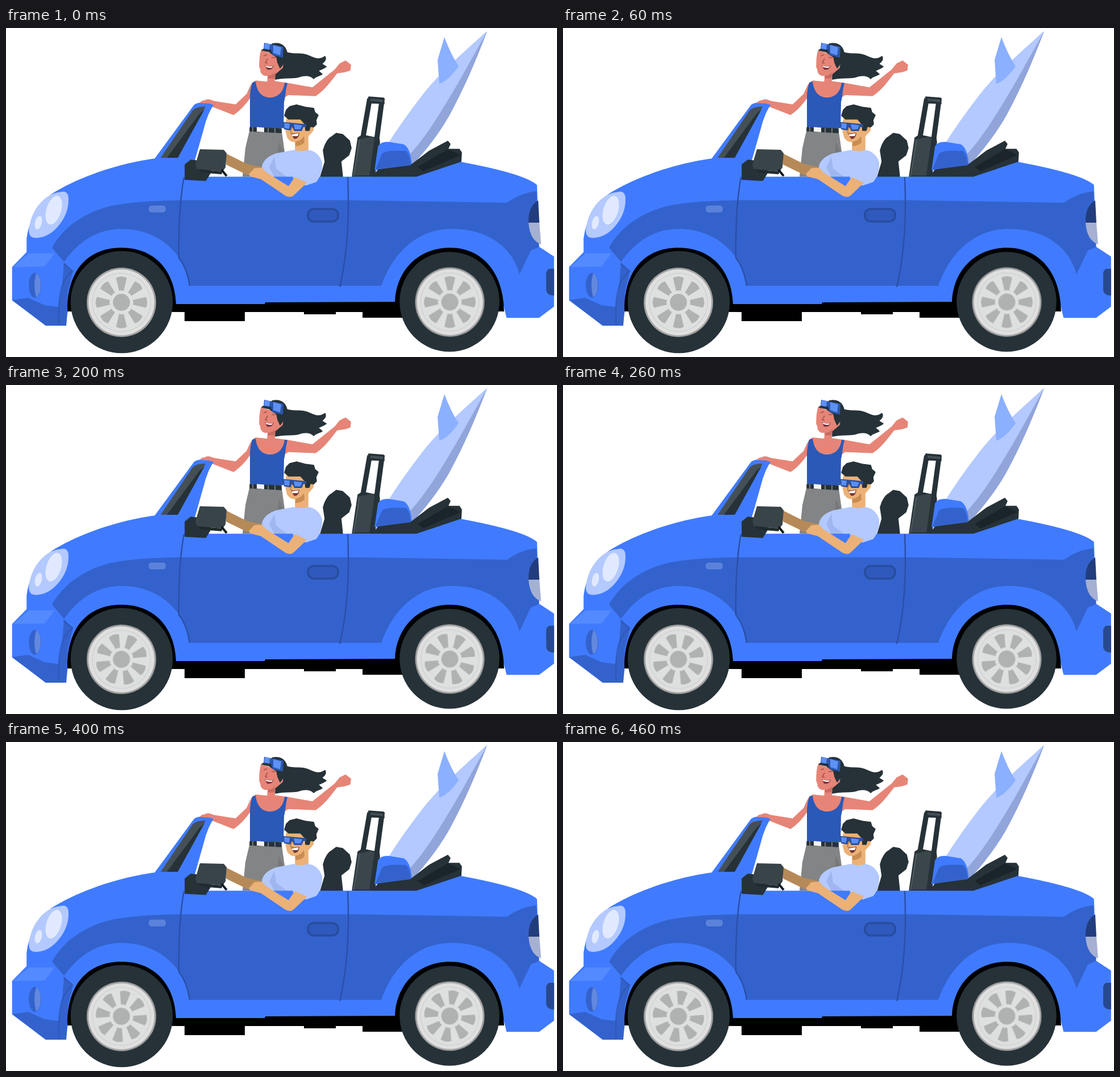
Write an HTML page that moves like this. It is 969x578 px and loops after 0.5 s.

```html
<!DOCTYPE html>
<html lang="en">
<head>
<meta charset="utf-8">
<title>Convertible road trip</title>
<style>
  html, body { margin: 0; width: 100%; height: 100%; overflow: hidden; background: #fff; }
  svg { display: block; width: 969px; height: 578px; }
  .ink { fill: #263238; stroke: #263238; }
  .blue { fill: #407bff; stroke: #407bff; }
  .shade { fill: #3462cc; }
  .pale { fill: #b3c9ff; stroke: #b3c9ff; }
  .rose { fill: #e68577; stroke: #e68577; }
  .tan { fill: #ebb177; stroke: #ebb177; }
  .ink, .blue, .pale, .rose, .tan { stroke-width: 1.6; stroke-linejoin: round; }
  .seam { fill: none; stroke: #2a4fa8; stroke-width: 2.4; }
  .spin { transform-origin: 0 0; animation: spin .5s steps(5, end) infinite; }
  @keyframes spin { to { transform: rotate(-45deg); } }
</style>
</head>
<body>
<svg viewBox="0 0 969 578">
  <defs>
    <path id="slot" d="M-4-20L-9.5-43Q0-48 9.5-43L4-20Q0-22-4-20Z"/>
    <g id="slots">
      <use href="#slot"/>
      <use href="#slot" transform="rotate(90)"/>
      <use href="#slot" transform="rotate(180)"/>
      <use href="#slot" transform="rotate(270)"/>
    </g>
    <g id="wheel">
      <circle r="61" fill="#a3a3a3"/>
      <circle r="58" fill="#e0e0e0"/>
      <circle r="52" fill="#d0d1d1"/>
      <circle r="50.5" fill="#dedfdf"/>
      <g fill="#b0b2b2">
        <use href="#slots"/>
        <use href="#slots" transform="rotate(45)"/>
        <circle r="15"/>
      </g>
    </g>
  </defs>

  <!-- standing passenger -->
  <path class="ink" d="M468 28C480 25 491 29 494 43C507 48 520 42 533 49C544 54 551 57 561 50C564 56 559 60 555 63L563 68C557 73 552 73 549 75L556 81C550 85 547 83 541 89C536 83 524 82 515 86C504 89 488 86 474 90L466 55Z"/>
  <path class="rose" d="M449 40C446 50 446 60 446 68L448 73C448 80 453 85 461 83L460 95L440 93C432 95 429 105 424 116L404 135L366 129L357 126L344 129L343 133L364 138L400 152C414 143 423 131 430 121H490L496 117L544 119C560 109 570 94 582 79L596 77L605 74L606 65L597 58L587 63L579 73L539 105L494 97L472 94L473 81L486 70L488 53Z"/>
  <path d="M460 84C466 84 471 81 474 77L472 88Q467 89 460 88Z" fill="#c96b63"/>
  <path class="ink" d="M450 39L470 28L489 38L488 62L482 70L478 61L476 51L463 42Z"/>
  <path d="M454 26L488 33L487 52L469 48L466 38L453 37Z" fill="#2c57ae"/>
  <path d="M455 27L464 28L463 38L454 36ZM470 30L484 34L482 48L470 44Z" fill="#5e91f5"/>
  <path d="M453 49L459 47M467 52L474 52M460 54L456 61L460 62" fill="none" stroke="#a4534f" stroke-width="1.6"/>
  <path d="M455 65Q463 69 471 66Q468 75 459 73Z" fill="#7c333a"/>
  <path d="M456 66Q464 69 470 67L467 70Q460 70 457 68Z" fill="#fff"/>
  <path d="M433 96L439 94C441 111 449 122 464 122C480 122 488 111 490 96L495 97C491 111 492 119 489 130L488 176H429V122Q429 109 433 96Z" fill="#2b59b8"/>
  <path d="M428 181L485 182L491 224V261H416L421 211Z" fill="#828485"/>
  <path d="M480 200L491 224V261H474Z" fill="#767879"/>
  <path class="ink" d="M429 175L484 177V184L429 181Z"/>
  <path d="M441 174L454 175V183L441 182Z" fill="#f3f3f3"/>
  <path d="M434 174V182M461 176V184M473 176V185" stroke="#777" stroke-width="2"/>

  <!-- seat and luggage -->
  <path class="ink" d="M553 262L561 235L558 215C561 202 568 193 573 191L581 185L592 187L604 198L607 211L603 223L589 234L592 262Z"/>
  <path d="M628 191L639 128H661L652 195" fill="none" stroke="#263238" stroke-width="9"/>
  <path class="ink" d="M638 121L664 123L665 133L636 131Z"/>
  <path d="M641 124L663 126V130L641 128Z" fill="#455056"/>
  <path class="ink" d="M609 261L619 193L627 188L656 194L657 201L648 261Z"/>
  <path d="M619 196L644 191L648 195L639 259H612Z" fill="#3b464b"/>
  <path d="M622 197L611 260" stroke="#4f5a5f" stroke-width="2"/>
  <path class="pale" d="M845 7C807 42 768 74 733 118Q698 163 671 206L712 242C736 217 759 188 778 155C805 106 826 55 845 7Z"/>
  <path d="M846 6C827 56 806 106 779 155C760 188 737 217 713 243L710 222C740 190 770 140 800 88Z" fill="#91a5da"/>
  <path d="M771 16L759 56L762 98Q779 92 796 67Q783 48 771 16Z" fill="#8bb0ff"/>
  <path class="blue" d="M649 249L655 208Q660 200 674 201L699 205Q712 213 713 243L690 251Z"/>
  <path class="shade" d="M650 248L661 221Q667 214 704 216Q711 224 712 242Z"/>
  <path class="ink" d="M644 262L655 249L711 242L745 216L777 199L781 204L777 213L797 213L801 219L800 236L724 264Z"/>
  <path d="M724 244L777 213L800 223L734 252Z" fill="#1b2529"/>

  <!-- driver -->
  <path class="tan" d="M494 158C491 170 491 181 495 192Q500 200 509 200V215Q520 222 531 215L531 190L540 180L541 166L532 157Z"/>
  <path d="M509 200Q519 198 524 190L525 201Q518 208 509 207Z" fill="#c98c52"/>
  <path class="ink" d="M493 144L499 138L511 135L526 139L541 141L543 148L549 153L545 162L546 169L541 174L535 173L533 180L527 180L526 169L518 160L497 160L490 154Z"/>
  <path d="M486 165L528 169V174L523 174L520 181L507 181L504 175L500 180L489 178Z" fill="#294f9c"/>
  <path d="M489 167L499 168L498 177L490 176ZM506 169L521 171L518 178L508 178Z" fill="#5a8ef4"/>
  <path d="M503 174L500 184L505 185" fill="none" stroke="#bd834c" stroke-width="1.6"/>
  <path d="M501 186L516 184Q515 195 507 195Z" fill="#773433"/>
  <path d="M502 187L515 185L513 190L504 190Z" fill="#fff"/>
  <path d="M386 220L424 239L448 244L437 258L424 258L387 240Z" fill="#b68a58"/>
  <path class="pale" d="M451 242Q455 228 475 221L506 215Q520 219 531 215Q548 217 555 235Q557 251 546 270L529 276L450 266Z"/>
  <path d="M472 226L463 245L473 263H496L475 247Z" fill="#a0b6ef"/>

  <!-- bodywork -->
  <path class="blue" d="M262 230C208 237 139 258 91 286C58 303 40 342 37 370V394L11.5 420V478L70 522H105L109 486H690L874 480L881 508.5H937L963 489V402L937 385L933 276C913 259 854 246 800 236L722 262H318L335 235Z"/>
  <path class="shade" d="M81 386C102 347 143 322 187 312C230 304 284 303 310 302.5H605L881 307Q906 289 933 287L937 385L923 391L903 433C892 390 853 353 784 353C724 353 681 394 660 453H323C315 397 270 353 202 353Q142 354 102 411Z"/>
  <path d="M40 396H85L68 419L12 420Z" fill="#548aff"/>
  <path class="shade" d="M11 478L39 474L68 487L92 490L99 448L102 412L118 427L109 463L106 523H70Z"/>
  <path class="seam" d="M101 414L117 427Q94 444 93 490V521" opacity=".5"/>
  <ellipse cx="51" cy="452" rx="11" ry="22" class="shade"/>
  <path d="M53 431C64 435 64 468 53 473Q47 452 53 431Z" fill="#6288df"/>
  <path class="seam" d="M313 262Q303 315 304 404Q318 421 323 453M601 262Q606 374 587 455"/>
  <rect x="531" y="318" width="53" height="22" rx="10" fill="#3059bd" stroke="#284d9f" stroke-width="3.6"/>
  <rect x="251" y="312" width="30" height="12" rx="5" fill="#5b82db"/>
  <path class="pale" d="M96 289Q108 286 109 298C111 330 85 366 54 368Q41 369 41 356C43 325 65 292 96 289Z"/>
  <g fill="#e0e9ff">
    <ellipse rx="13" ry="26" transform="translate(84 320) rotate(17)"/>
    <ellipse rx="6" ry="12" transform="translate(57 342) rotate(13)"/>
  </g>
  <path d="M936 303Q918 313 919 342H938Z" fill="#223d7d"/>
  <path d="M919 342H938L941 380Q921 373 919 342Z" fill="#a5b0d2"/>
  <path d="M964 423H955Q949 426 950 435V460Q951 470 964 470Z" fill="#28498f"/>

  <!-- windscreen, mirror, near arm -->
  <path class="blue" d="M262 230L331 136Q337 130 367 131Q354 148 347 177L330 237L285 234Z"/>
  <path d="M272 228L328 145Q334 138 351 138L302 228Z" fill="#455056"/>
  <path d="M283 228L340 151L349 143L302 228Z" fill="#263238"/>
  <path class="rose" d="M342 131L354 126L367 130V135L358 132Z"/>
  <path class="ink" d="M315 240L325 232L350 235L359 255L351 268L315 266Z"/>
  <path d="M341 213L383 214L388 220L386 245L381 252L336 248L333 240Z" fill="#394449"/>
  <path d="M337 248L381 252L379 257L343 254Z" fill="#202b30"/>
  <path d="M379 249L388 260" stroke="#111b20" stroke-width="4"/>
  <path class="pale" d="M522 230L555 240Q555 258 545 270L527 276L505 263Z"/>
  <path class="tan" d="M428 257L437 247L450 246L457 254L497 279L508 263L528 272L505 294Q500 298 492 294L449 265L430 260Z"/>

  <!-- underside and arches -->
  <path d="M108 498C107 426 144 386 203 386C263 386 297 428 299 485H455L456 482L684 481C686 427 724 386 781 386C837 386 875 429 876 498H699V509H627V499H580V503H524V499H420V515H314V499Z"/>

  <!-- wheels -->
  <circle class="ink" cx="203.5" cy="481.5" r="89"/>
  <g transform="translate(203 482)"><g class="spin"><use href="#wheel"/></g></g>
  <circle class="ink" cx="780" cy="481" r="87"/>
  <g transform="translate(780.5 481.5)"><g class="spin"><use href="#wheel"/></g></g>
</svg>
</body>
</html>
```
